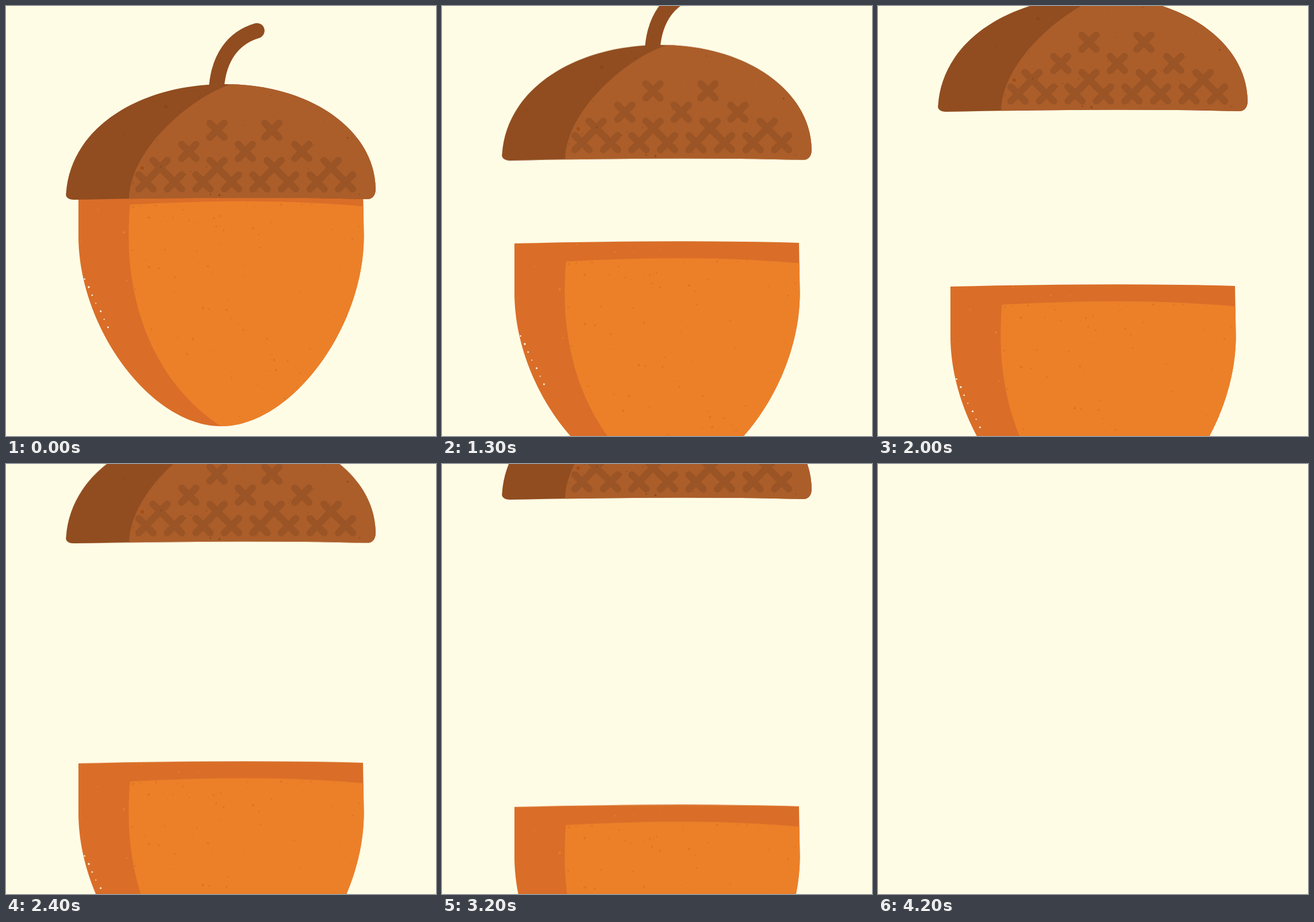
Recreate the animation shown at these times as an HTML page. Size 748 by 748 pixels, loop 4800 ms.

```html
<!DOCTYPE html>
<html lang="en">
<head>
<meta charset="utf-8">
<title>Acorn</title>
<style>
  html, body { margin: 0; width: 100%; height: 100%; overflow: hidden; background: #fffce6; }
  svg { display: block; width: 100vw; height: 100vh; }
</style>
</head>
<body>
<svg viewBox="0 0 748 748">
  <defs>
    <path id="nutShape" d="M126 314 Q424 307 621 313 L622.5 400 C622.5 560 496 731 374 731 C252 731 126 560 126 400 Z"/>
    <path id="capShape" d="M104.5 326 C112 210 236 134 385 136 C525 137 641 212 643 318 C643 330 637 336 628 336 Q420 330.5 118 337 C108 337 103 332 104.5 326 Z"/>
    <path id="nutLight" d="M374 731 C266 660 213.5 535 213.5 400 Q213.5 370 215.5 347 Q215.5 345.5 217 345.4 Q450 332.5 621 348.5 H640 V740 Z"/>
    <path id="capLight" d="M392 130 V136 C332 154 216 243 214 336 V345 H660 V130 Z"/>
    <clipPath id="nutClip"><use href="#nutShape"/></clipPath>
    <clipPath id="nutLightClip"><use href="#nutLight"/></clipPath>
    <clipPath id="capClip"><use href="#capShape"/></clipPath>
  </defs>
  <g id="nut">
    <use href="#nutShape" fill="#da6e28"/>
    <g clip-path="url(#nutClip)">
      <use href="#nutLight" fill="#ec8029"/>
      <g id="nutGrain" fill="#dc7425" clip-path="url(#nutLightClip)"/>
      <g id="nutFlecks" fill="#ec8029"/>
    </g>
    <g id="nutChips" fill="#fffce6"/>
  </g>
  <g id="cap">
    <path d="M365.5 150 L366.5 138 C371 92 393 56 436.5 43" fill="none" stroke="#914d20" stroke-width="26.5" stroke-linecap="round"/>
    <use href="#capShape" fill="#914d20"/>
    <g clip-path="url(#capClip)">
      <use href="#capLight" fill="#ab5e2a"/>
      <path id="crosses" fill="none" stroke="#9a5425" stroke-width="12" stroke-linecap="round"/>
      <g id="capGrain" fill="#874719"/>
      <circle cx="278" cy="175" r="3" fill="#874719"/>
      <circle cx="237" cy="282" r="3" fill="#a34e13"/>
    </g>
  </g>
</svg>
<script>
const $ = id => document.getElementById(id);

let seed = 11;
const random = () => (seed = (seed * 16807) % 2147483647) / 2147483647;

function dot(group, x, y, r) {
  const c = document.createElementNS('http://www.w3.org/2000/svg', 'circle');
  c.setAttribute('cx', x.toFixed(1));
  c.setAttribute('cy', y.toFixed(1));
  c.setAttribute('r', r.toFixed(2));
  $(group).append(c);
}

function scatter(group, count, [x, y, w, h], size, topBias = 1) {
  for (let i = 0; i < count; i++) {
    dot(group, x + w * random(), y + h * random() ** topBias, 0.4 + size * random() ** 3);
  }
}

scatter('nutGrain', 220, [214, 345, 405, 370], 1.8, 1.6);
scatter('capGrain', 70, [110, 140, 530, 190], 1.3);
scatter('nutFlecks', 10, [126, 350, 100, 290], 1.8);
scatter('nutFlecks', 10, [220, 312, 400, 25], 1.8);

// Chips run down the left edge of the nut.
for (let i = 0; i < 7; i++) {
  const y = 475 + 14 * i;
  dot('nutChips', 135 + 0.5 * (y - 475) + 3 * random(), y, 0.8 + random());
}

function crossRow(y, firstX, gap, count) {
  return Array.from({ length: count }, (_, i) =>
    `M${firstX + gap * i - 12.5} ${y - 12.5}l25 25m0 -25l-25 25`).join('');
}
$('crosses').setAttribute('d',
  crossRow(216, 367, 95.5, 2) + crossRow(253, 318, 98.3, 3) +
  crossRow(281, 268, 99.2, 4) + crossRow(306, 243.5, 49.6, 8));

// One step is 100 ms; on a held step the previous pose stays.
const STEP = 100, STEPS = 48, GONE = 42;
const HOLDS = [3, 17, 21, 31, 35, 37];
const keys = [
  { s: 0, cap: 0, nut: 0 },
  { s: 2, cap: -0.4, nut: 0.5 },
  { s: 9, cap: -32, nut: 50 },
  { s: 16, cap: -102, nut: 136 },
  { s: 20, cap: -153, nut: 174 },
  { s: 28, cap: -239.5, nut: 241 },
  { s: 36, cap: -307, nut: 332.5 },
  { s: 42, cap: -352, nut: 430 }
];

const slope = (part, a, b) => (b[part] - a[part]) / (b.s - a.s);

function speed(part, i) {
  const [a, b, c] = [keys[i - 1], keys[i], keys[i + 1]];
  if (!a) return 0;
  if (!c) return slope(part, a, b);
  return (slope(part, a, b) * (c.s - b.s) + slope(part, b, c) * (b.s - a.s)) / (c.s - a.s);
}

// Smooth cubic through the keys.
function offsetAt(part, s) {
  const i = Math.max(1, keys.findIndex(k => k.s >= s));
  const a = keys[i - 1], b = keys[i];
  const h = b.s - a.s, u = (s - a.s) / h, w = 1 - u;
  return w * w * (1 + 2 * u) * a[part] + u * u * (3 - 2 * u) * b[part] +
    h * u * w * (w * speed(part, i - 1) - u * speed(part, i));
}

function play(part, exit) {
  const frames = Array.from({ length: STEPS + 1 }, (_, s) => {
    const pose = HOLDS.includes(s) ? s - 1 : s;
    const y = pose < GONE ? offsetAt(part, pose) : exit;
    return { offset: s / STEPS, transform: `translateY(${y.toFixed(2)}px)`, easing: 'step-end' };
  });
  $(part).animate(frames, { duration: STEP * STEPS, iterations: Infinity });
}

play('cap', -800);
play('nut', 800);
</script>
</body>
</html>
```
